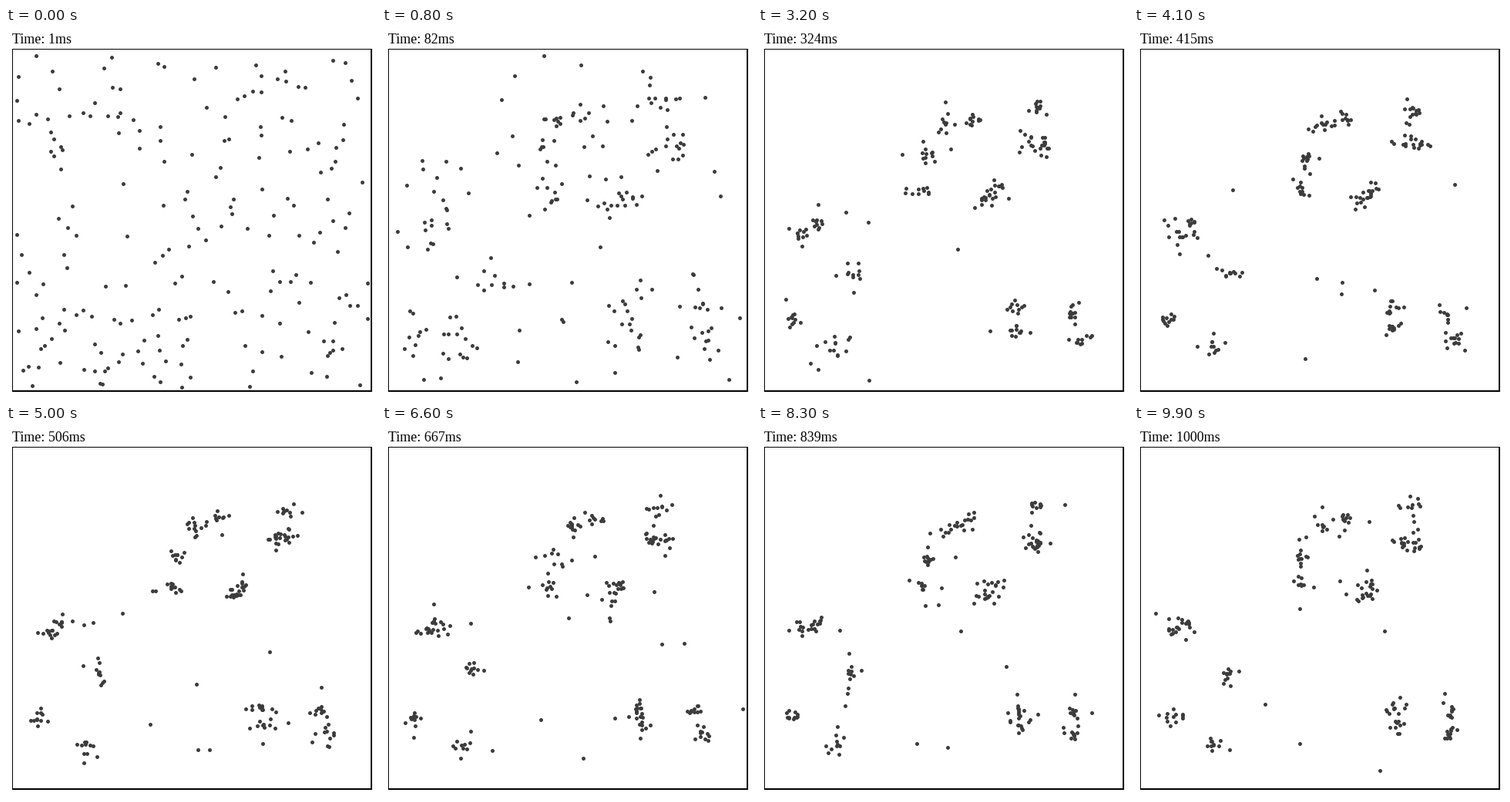
A matplotlib script for the animation above (10000 ms loop, 480 px wide and 480 px high).

```python
import numpy as np
import matplotlib.pyplot as plt
from matplotlib.animation import FuncAnimation
from matplotlib.patches import Rectangle

SIZE, DPI = 480, 100
FRAMES, STEP_MS = 100, 100
PX = 72 / DPI
LOW, HIGH = np.array([12, 31]), np.array([470, 467])

# Places where the particles gather
HUBS = np.array([
    (246, 126), (276, 117), (222, 165), (214, 202), (294, 214), (305, 208),
    (358, 106), (356, 142), (369, 146), (75, 247), (56, 270), (118, 314),
    (42, 382), (96, 412), (333, 362), (336, 388), (403, 369), (421, 402),
], float)
PER_HUB, LONERS = 11, 6
SPREAD, HOP, ROAM = 7.5, 14, 25

rng = np.random.default_rng(12)
ticks = np.arange(FRAMES)[:, None]


def fold(v):
    """Bounce positions off the walls."""
    span = HIGH - LOW
    return LOW + span - np.abs((v - LOW) % (2 * span) - span)


def walk(steps, size):
    """Random walk that begins at the origin."""
    hops = rng.normal(0, size, (steps, 2))
    hops[0] = 0
    return np.cumsum(hops, axis=0)


def jitter(keep=0.65):
    """Correlated noise with a few long excursions."""
    z = rng.normal(size=(FRAMES, 2))
    for k in range(1, FRAMES):
        z[k] = keep * z[k - 1] + np.sqrt(1 - keep ** 2) * z[k]
    return z * (0.6 + 0.17 * z ** 2)


def share_out(start):
    """Give each hub its nearest free particles; the rest get -1."""
    dist = np.linalg.norm(start[:, None] - HUBS, axis=2)
    owner = np.full(len(start), -1)
    room = np.full(len(HUBS), PER_HUB)
    for flat in np.argsort(dist, axis=None):
        p, h = divmod(flat, len(HUBS))
        if owner[p] < 0 and room[h]:
            owner[p] = h
            room[h] -= 1
    return owner


def gather(start, hub):
    """Wander until caught, then settle closer and closer to the hub."""
    side = start - hub[0]
    side *= min(1, 32 / np.linalg.norm(side))
    path = hub + side * np.exp(-ticks / 15) + SPREAD * jitter()
    caught = int(np.clip(2 + rng.exponential(7), 2, FRAMES - 1))
    k = ticks[:caught + 1] / caught
    roam = walk(caught + 1, HOP)
    path[:caught + 1] = start + (path[caught] - start) * k + roam - k * roam[-1]
    return path


starts = rng.uniform(LOW, HIGH, (len(HUBS) * PER_HUB + LONERS, 2))
drift = [hub + walk(FRAMES, 0.4) for hub in HUBS]
paths = [gather(s, drift[h]) if h >= 0 else s + walk(FRAMES, ROAM)
         for s, h in zip(starts, share_out(starts))]
dots = np.round(fold(np.stack(paths, axis=1)))

fig = plt.figure(figsize=(SIZE / DPI, SIZE / DPI), dpi=DPI, facecolor="white")
ax = fig.add_axes([0, 0, 1, 1])
ax.set(xlim=(0, SIZE), ylim=(SIZE, 0))
ax.axis("off")
ax.add_patch(Rectangle((8, 27), 467, 445, fc="black", lw=0))
ax.add_patch(Rectangle((9, 28), 464, 442, fc="white", lw=0))
label = ax.text(8, 20, "", family="Liberation Serif", fontsize=18 * PX,
                color="black", va="baseline")
cloud = ax.scatter([], [], s=(5 * PX) ** 2, c="#3c3c3c", linewidths=0)


def draw(k):
    time = round(1 + k * 999 / (FRAMES - 1))
    label.set_text(f"Time: {time}ms")
    cloud.set_offsets(dots[k] + 0.5)
    return label, cloud


anim = FuncAnimation(fig, draw, frames=FRAMES, interval=STEP_MS,
                     repeat=True, repeat_delay=0)
plt.show()
```
